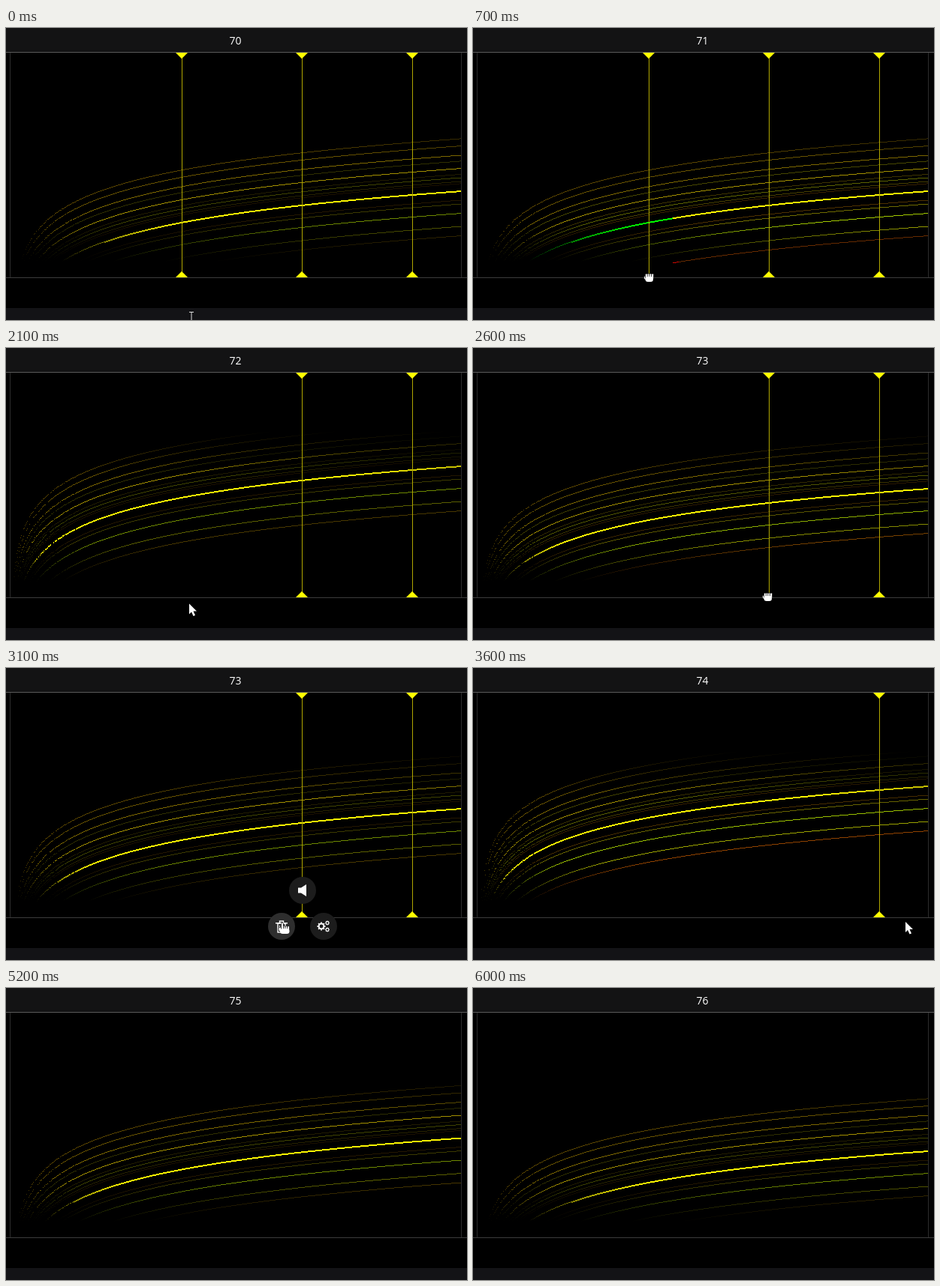
These frames come from a looping animation (614x390 px, 6.1 s). An HTML page with a canvas:

```html
<!DOCTYPE html>
<html>
<head>
<meta charset="utf-8">
<style>
html, body { margin: 0; width: 100%; height: 100%; overflow: hidden; background: #000; }
canvas { display: block; }
#beat { position: absolute; left: 0; top: 8px; width: 611px; text-align: center;
  font: 500 14px/18px "Open Sans", "Noto Sans", sans-serif; color: #fff; }
</style>
</head>
<body>
<canvas id="stage" width="614" height="390"></canvas>
<div id="beat"></div>
<script>
const LOOP = 6100, STEP = 100, BEAT = 1000, LEAD = 600;
const g = document.getElementById('stage').getContext('2d');
const label = document.getElementById('beat');
const clamp = v => Math.max(0, Math.min(1, v));
const mix = (a, b, k) => a + (b - a) * k;
const noise = n => { const s = Math.sin(n * 12.9898) * 43758.5453; return s - Math.floor(s); };

// One note per beat: semitones above the lowest note, and strength of the attack
const notes = [[0, 0.8], [0, 0.8], [24, 1], [12, 0.5], [24, 0.7], [7, 0.9], [0, 0.8]];

const markers = [
  { x: 234, menuY: 332, open: 1000, close: 1900 },
  { x: 394, menuY: 329, open: 2900, close: 3200 },
  { x: 541, menuY: 327, open: 4300, close: 4700 }
];
// time, x, y of the mouse
const path = [
  [0, 247, 385], [600, 234, 333], [1400, 234, 333], [1600, 225, 345], [1800, 207, 344], [2000, 207, 344],
  [2500, 392, 332], [2900, 392, 332], [3100, 368, 340], [3300, 368, 340],
  [3600, 576, 339], [4100, 541, 331], [4300, 541, 331], [4500, 517, 338], [5100, 517, 338]
];

function rect(color, x, y, w, h) { g.fillStyle = color; g.fillRect(x, y, w, h); }
function poly(color, ...p) {
  g.fillStyle = color;
  g.beginPath();
  for (let i = 0; i < p.length; i += 2) g.lineTo(p[i], p[i + 1]);
  g.closePath();
  g.fill();
}
function disc(color, x, y, r) {
  g.fillStyle = color;
  g.beginPath();
  g.arc(x, y, r, 0, 7);
  g.fill();
}
function at(x, y, draw) { g.save(); g.translate(x, y); draw(); g.restore(); }

function panel() {
  rect('#000', 0, 0, 614, 390);
  rect('#131314', 0, 0, 614, 32);
  rect('#5a5a5a', 0, 32, 614, 1);
  rect('#2c2c2c', 5, 33, 1, 300);
  rect('#2c2c2c', 606, 33, 1, 300);
  rect('#3c3c3c', 0, 333, 614, 1);
  rect('#131316', 0, 374, 614, 16);
}

// A partial at p/q of the note's frequency; all follow one logarithmic curve, 30 px per octave
function partial(p, q, shift, struck, seed) {
  const base = 218 - 2.5 * shift - 30 * Math.log2(p / q);
  const strength = p ** -0.65 * q ** (0.7 * struck - 0.9);
  const front = shift < 12 && struck ? 6 + 260 * 2 ** (-shift / 24) : 0;
  const lowest = p === 1 && q === 4, main = p === q;
  const tint = 58 + 14 * Math.sin(1.4 * (q - 1)) - 5 * Math.log2(p) - (lowest ? 26 * struck : 0);
  for (let x = 10; x < 606; x++) {
    const y = base + 30 * Math.log2(600 / (x - 6));
    const behind = x < front;
    if (y > 318 || lowest && behind) continue;
    const blur = clamp((100 - x) / 90), r = noise(x * 3.7 + base * 91 + seed);
    if (r < blur * 0.4) continue;
    const start = lowest && x < front + 8;
    const floor = lowest && front ? 0.8 * struck : 0;
    const fade = clamp((y - 112) / 60) * Math.max(floor, clamp((312 - y) / 52));
    const level = start ? struck : strength * fade;
    const hue = start ? 2 : mix(tint, 120, main && behind ? clamp(struck * 2) : 0);
    const thick = main && level > 0.5 || level > 0.85 ? 2 : 1;
    rect(`hsl(${hue} 100% ${50 * level}%)`, x, Math.round(y + (r - 0.5) * blur * 3) - 1, 1, thick);
  }
}

function spectrum([shift, force], age) {
  const struck = force * (1 - clamp((age - 300) / 300));
  g.globalCompositeOperation = 'lighter';
  for (let q = 1; q <= 4; q++) {
    for (let p = 1; p <= 5; p++) {
      const reduced = !(p % 2 === 0 && q % 2 === 0) && (p !== q || p === 1) ;
      if (reduced) partial(p, q, shift, struck, age / STEP);
    }
  }
  g.globalCompositeOperation = 'source-over';
}

function trash() {
  g.strokeRect(-5, -4, 10, 12);
  g.strokeRect(-2.5, -7, 5, 2.5);
  rect('#fff', -8, -5, 16, 1.5);
  for (const x of [-2.5, 0, 2.5]) rect('#fff', x - 0.5, -1, 1, 7);
}
function speaker() { poly('#fff', -6, -3.5, -2, -3.5, 5, -8, 5, 8, -2, 3.5, -6, 3.5); }
function gear(x, y, r) {
  at(x, y, () => {
    for (let i = 0; i < 8; i++) {
      g.rotate(Math.PI / 4);
      rect('#fff', -r * 0.22, -r * 1.25, r * 0.44, r * 0.6);
    }
    disc('#fff', 0, 0, r);
    disc('#1c1c1c', 0, 0, r * 0.55);
  });
}
function gears() { gear(-3, 0, 4.4); gear(5, -4.5, 2.4); gear(5, 4.5, 2.4); }

function button(x, y, icon, hot) {
  disc(hot ? '#2e2e2e' : '#1c1c1c', x, y, 18);
  g.strokeStyle = '#fff';
  g.lineWidth = 1.4;
  at(x, y, icon);
}

function finger(x, y, w, h, outline = true) {
  g.beginPath();
  g.roundRect(x, y, w, h, Math.min(w, h) / 2);
  g.fill();
  if (outline) g.stroke();
}
const shapes = {
  text() {
    rect('#ddd', -0.5, -5, 1, 14);
    rect('#ddd', -3, -6, 6, 1);
  },
  arrow() { poly('#fff', 0, 0, 0, 14, 3, 11, 5.5, 16.5, 8, 15.5, 5.5, 10, 10, 10); },
  grab() {
    finger(-6.5, -2, 4, 5);
    for (let i = 0; i < 4; i++) finger(-4.5 + i * 2.7, -5, 3, 7);
    finger(-4.5, -1, 10.5, 7, false);
  },
  hand() {
    finger(-5, 6, 4, 6);
    for (let i = 1; i < 4; i++) finger(-1.5 + i * 2.7, 4.5, 3, 8);
    finger(-1.5, 0, 3, 11);
    finger(-3, 8, 12.5, 7, false);
  }
};

function mouse(t) {
  const i = path.findIndex(key => key[0] > t);
  if (i < 0) return null;
  const [t0, x0, y0] = path[i - 1], [t1, x1, y1] = path[i], k = (t - t0) / (t1 - t0);
  return { x: mix(x0, x1, k), y: mix(y0, y1, k) };
}
const near = (m, x, y, r) => m && Math.hypot(m.x - x, m.y - y) < r;

function draw(t) {
  const beat = Math.floor((t + LEAD) / BEAT), pos = mouse(t);
  let shape = pos && pos.y > 374 ? 'text' : 'arrow';
  label.textContent = 70 + beat;
  panel();
  spectrum(notes[beat], (t + LEAD) % BEAT);
  for (const { x, menuY, open, close } of markers) {
    if (t >= close) continue;
    const held = t < open && near(pos, x, 332, 7);
    rect('#b0a600', x, 33, 1, 300);
    poly('#ff0', x - 8, 33, x + 8, 33, x, 41);
    if (held) shape = 'grab';
    else poly('#ff0', x - 8, 333, x + 8, 333, x, 325);
  }
  for (const { x, menuY, open, close } of markers) {
    if (t < open || t >= close) continue;
    const hot = near(pos, x - 27, menuY + 16, 16);
    if (hot) shape = 'hand';
    button(x + 1, menuY - 32, speaker);
    button(x - 27, menuY + 16, trash, hot);
    button(x + 29, menuY + 16, gears);
  }
  if (!pos) return;
  g.fillStyle = '#fff';
  g.strokeStyle = '#000';
  g.lineWidth = 0.7;
  at(pos.x, pos.y, shapes[shape]);
}

let shown = -1;
function tick() {
  const t = Math.floor(performance.now() % LOOP / STEP) * STEP;
  if (t !== shown) draw(shown = t);
  requestAnimationFrame(tick);
}
tick();
</script>
</body>
</html>
```
